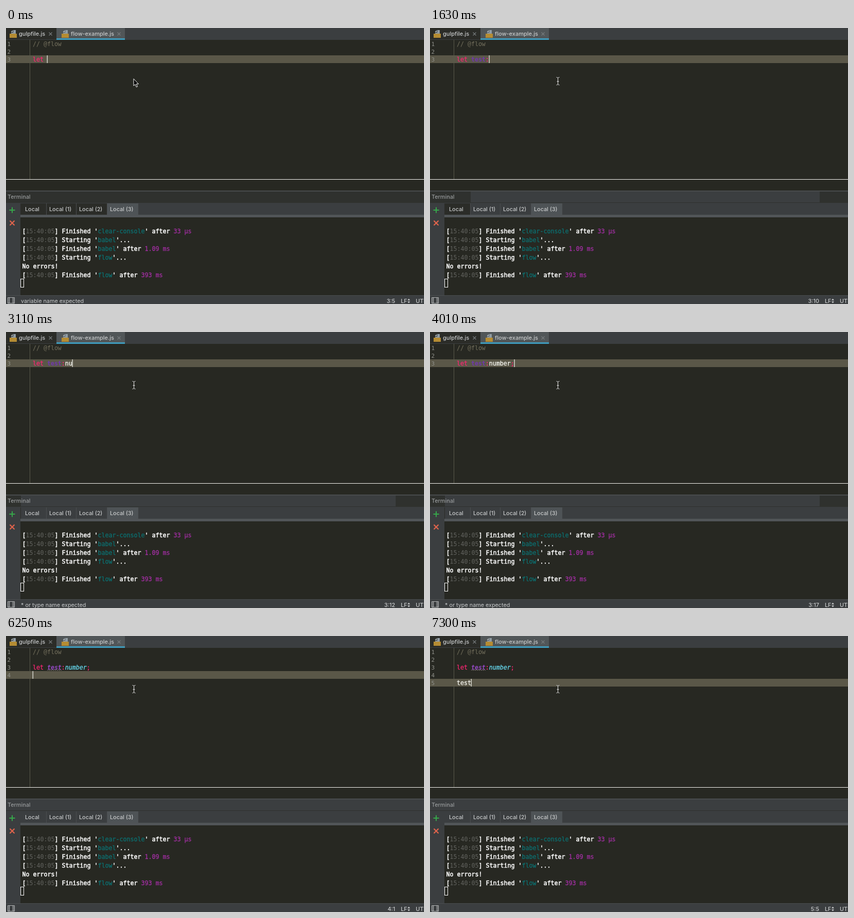
An HTML page that plays this animation: 812 px wide and 535 px high, repeating every 8000 ms.

```html
<!DOCTYPE html>
<html lang="en">
<head>
<meta charset="utf-8">
<title>Typing in an editor</title>
<style>
html, body { margin: 0; width: 100%; height: 100%; overflow: hidden; background: #272822; }
svg { display: block; }
text { white-space: pre; font: 500 10.8px Inter, "Open Sans", sans-serif; fill: #c8cacb; }
.tab { font-size: 11px; }
.hint { font-weight: 400; }
.mono text { font: 11.6px "DejaVu Sans Mono", "Liberation Mono", monospace; fill: #f8f8f2; stroke-width: .3px; }
.mono text.num { font-size: 11px; fill: #90918b; }
.mono .comment { fill: #75715e; }
.kw { fill: #f92672; stroke: #f92672; }
.plain { fill: #f8f8f2; stroke: #f8f8f2; }
.picked { fill: #8a48c8; font-weight: 700; font-style: italic; }
.dim { fill: #7038ac; font-weight: 700; }
.unused { fill: #9448c4; font-weight: 700; font-style: italic; }
.type { fill: #66d9ef; stroke: #66d9ef; font-style: italic; }
.term text { font-size: 11.63px; fill: #fff; stroke: #fff; stroke-width: .5px; }
.term .time { fill: #62635f; stroke: none; }
.term .task { fill: #0b7172; stroke: #0b7172; stroke-width: .3px; }
.term .span { fill: #a22fa2; stroke: #a22fa2; stroke-width: .3px; }
#beam { filter: drop-shadow(0 0 .7px #000); }
</style>
</head>
<body>
<svg width="812" height="535" viewBox="0 0 812 535">
  <defs>
    <g id="file">
      <path d="M14 4h5v7h-9v-2h4z" fill="#8f9ba3"/>
      <path d="M9.500 8l3.500-4v4z" fill="#b4bec4"/>
      <rect x="7" y="11" width="14" height="8" fill="#b58c33"/>
    </g>
    <path id="close" d="M-3-3l6 6M3-3l-6 6" stroke="#777b7d" stroke-width="1.2"/>
  </defs>
  <rect width="812" height="535" fill="#272822"/>

  <!-- editor tabs -->
  <rect width="812" height="23" fill="#3b3e40"/>
  <rect width="98" height="22" fill="#2b2c28"/>
  <rect x="98" width="133" height="20" fill="#515658"/>
  <rect x="98" y="20" width="133" height="3" fill="#3f9cbd"/>
  <use href="#file"/><use href="#file" x="101"/>
  <text class="tab" x="25" y="15">gulpfile.js</text>
  <text class="tab" x="126" y="15">flow-example.js</text>
  <use href="#close" x="86.5" y="11.5"/><use href="#close" x="219.5" y="11.5"/>

  <!-- editor -->
  <rect id="row" width="812" height="15" fill="#5a5748"/>
  <path d="M46.5 23V293" stroke="#5b5a4b"/>
  <rect id="pick" x="80" y="53" width="28" height="15" fill="#04044f"/>
  <g id="nums" class="mono"></g>
  <g class="mono">
    <text class="comment" x="52" y="35">// @flow</text>
    <text id="decl" x="52" y="65"></text>
    <text id="last" x="52" y="95"></text>
  </g>
  <path id="wave" fill="none" stroke="#86777f" stroke-width=".9"/>
  <rect id="caret" width="1.4" height="15" fill="#dcdcd4"/>
  <path id="arrow" d="M248 98.5v13.5l3-2.8 2.2 5.3 2.2-1-2.2-5h4.2z" fill="#000" stroke="#fff"/>
  <path id="beam" d="M245.5 95.5q3 0 3 2q0-2 3-2M248.5 97v12M245.5 110.5q3 0 3-2q0 2 3 2M246.5 103.5h4" fill="none" stroke="#e8e8e8"/>
  <rect y="293" width="812" height="1" fill="#f4f4f0"/>

  <!-- terminal panel -->
  <rect y="315" width="812" height="2" fill="#484b4c"/>
  <rect y="317" width="812" height="22" fill="#2f312e"/>
  <rect y="339" width="812" height="24" fill="#3b3e40"/>
  <rect y="339" width="28" height="179" fill="#3b3e40"/>
  <rect x="28" y="340" width="168" height="22" fill="#2b2c28"/>
  <g id="band" fill="#3b3e40">
    <rect y="317" height="21"/>
    <rect y="340" height="22"/>
  </g>
  <text x="3" y="331" style="fill:#96999a">Terminal</text>
  <rect x="197" y="340" width="60" height="22" fill="#4e5356"/>
  <path d="M78.5 340v22M136.5 340v22M196.5 340v22" stroke="#4b4e50"/>
  <rect x="28" y="362" width="784" height="5" fill="#515558"/>
  <text x="37" y="355">Local</text>
  <text x="84" y="355">Local (1)</text>
  <text x="142" y="355">Local (2)</text>
  <text x="202" y="355">Local (3)</text>
  <path d="M6.5 353h11M12 347.5v11" stroke="#36a94a" stroke-width="2"/>
  <path d="M7.5 373.5l9 9M16.5 373.5l-9 9" stroke="#e0644c" stroke-width="2.2"/>
  <g id="term" class="mono term"></g>
  <rect x="28.5" y="486.5" width="6" height="16" fill="none" stroke="#fff"/>

  <!-- status bar -->
  <rect y="518" width="812" height="17" fill="#3b3e40"/>
  <rect y="518" width="812" height="1" fill="#4a4d4f"/>
  <path d="M3.5 522.5h13v11h-13zM6.5 522.5v11M13.5 522.5v11" fill="none" stroke="#b4b6b7"/>
  <path d="M5 524v9M15 524v9" stroke="#b4b6b7" stroke-dasharray="1 1"/>
  <text id="hint" class="hint" x="29" y="533"></text>
  <text id="pos" x="756" y="533" text-anchor="end"></text>
  <text x="767" y="533">LF</text>
  <path d="M780 528l2.5-3.5 2.5 3.5zM780 530l2.5 3.5 2.5-3.5z" fill="#c4c6c7"/>
  <text x="796" y="533">UTF-8</text>
</svg>
<script>
const LOOP = 8000, CELL = 6.984, LEFT = 52;
const $ = id => document.getElementById(id);
const span = (cls, s) => s ? `<tspan class="${cls}">${s}</tspan>` : '';
const rowTop = line => 23 + 15 * (line - 1);

// Each track lists [start time, value]; a value holds until the next start.
const head = 'let test:', full = head + 'number;';
const typed = [
  [0, 'let '], [150, 'let t'], [300, 'let te'], [450, 'let test'], [1630, head],
  [2220, head + 'n'], [2370, head + 'nu'], [2670, head + 'nub'], [3110, head + 'nu'],
  [3260, head + 'num'], [3410, head + 'numb'], [3560, head + 'numbe'], [3710, head + 'number'],
  [4010, full], [5200, full + '\n'], [6550, full + '\n\n'],
  [6850, full + '\n\nt'], [7150, full + '\n\ntes'], [7300, full + '\n\ntest']
];
const nameLook = [[0, 'plain'], [740, 'picked'], [1630, 'dim'], [5200, 'unused']];
const typeLook = [[0, 'plain'], [4310, 'type']];
const hints = [[0, 'variable name expected'], [890, ''], [1930, '* or type name expected'], [4310, '']];
const caretOn = [[0, true], [5650, false], [6250, true]];
const bands = [[0, [0, 0]], [150, [79, 757]], [1930, [29, 757]], [5200, [0, 812]]];
const pointers = [[0, 'arrow'], [1630, 'beam']];

const at = (track, t) => track.filter(([start]) => start <= t).pop()[1];
const show = (id, on) => $(id).setAttribute('visibility', on ? 'visible' : 'hidden');
function set(el, attrs) {
  for (const key in attrs) el.setAttribute(key, attrs[key]);
}

function declaration(code, t) {
  const [, name, colon, type, end] = /^let (\w*)(:?)(\w*)(;?)$/.exec(code);
  return span('kw', 'let ') + span(at(nameLook, t), name) + span('kw', colon) +
    span(at(typeLook, t), type) + span('kw', end);
}

function render(t) {
  const lines = at(typed, t).split('\n');
  const line = lines.length + 2, col = lines[lines.length - 1].length;
  const look = at(nameLook, t), [from, to] = at(bands, t), pointer = at(pointers, t);

  $('decl').innerHTML = declaration(lines[0], t);
  $('last').innerHTML = span('plain', lines[2]);
  $('nums').innerHTML = Array.from({ length: line }, (_, i) =>
    `<text class="num" x="2.5" y="${rowTop(i + 1) + 12}">${i + 1}</text>`).join('');
  set($('row'), { y: rowTop(line) });
  set($('caret'), { x: LEFT + col * CELL - .4, y: rowTop(line) });
  for (const part of $('band').children) set(part, { x: from, width: to - from });
  show('caret', at(caretOn, t));
  show('pick', look === 'picked');
  show('wave', look === 'unused');
  show('arrow', pointer === 'arrow');
  show('beam', pointer === 'beam');
  $('hint').textContent = at(hints, t);
  $('pos').textContent = `${line}:${col + 1}`;
}

function drawTerminal() {
  const stamp = `[${span('time', '15:40:05')}] `;
  const start = task => `${stamp}Starting '${span('task', task)}'...`;
  const done = (task, time) => `${stamp}Finished '${span('task', task)}' after ${span('span', time)}`;
  const log = [
    done('clear-console', '33 µs'), start('babel'), done('babel', '1.09 ms'),
    start('flow'), 'No errors!', done('flow', '393 ms')
  ];
  $('term').innerHTML = log.map((s, i) => `<text x="31.5" y="${398 + 17 * i}">${s}</text>`).join('');
}

drawTerminal();
set($('wave'), { d: 'M80 67' + 'l2-2l2 2'.repeat(7) });
const begin = performance.now();
function tick() {
  render((performance.now() - begin) % LOOP);
  requestAnimationFrame(tick);
}
tick();
</script>
</body>
</html>
```
